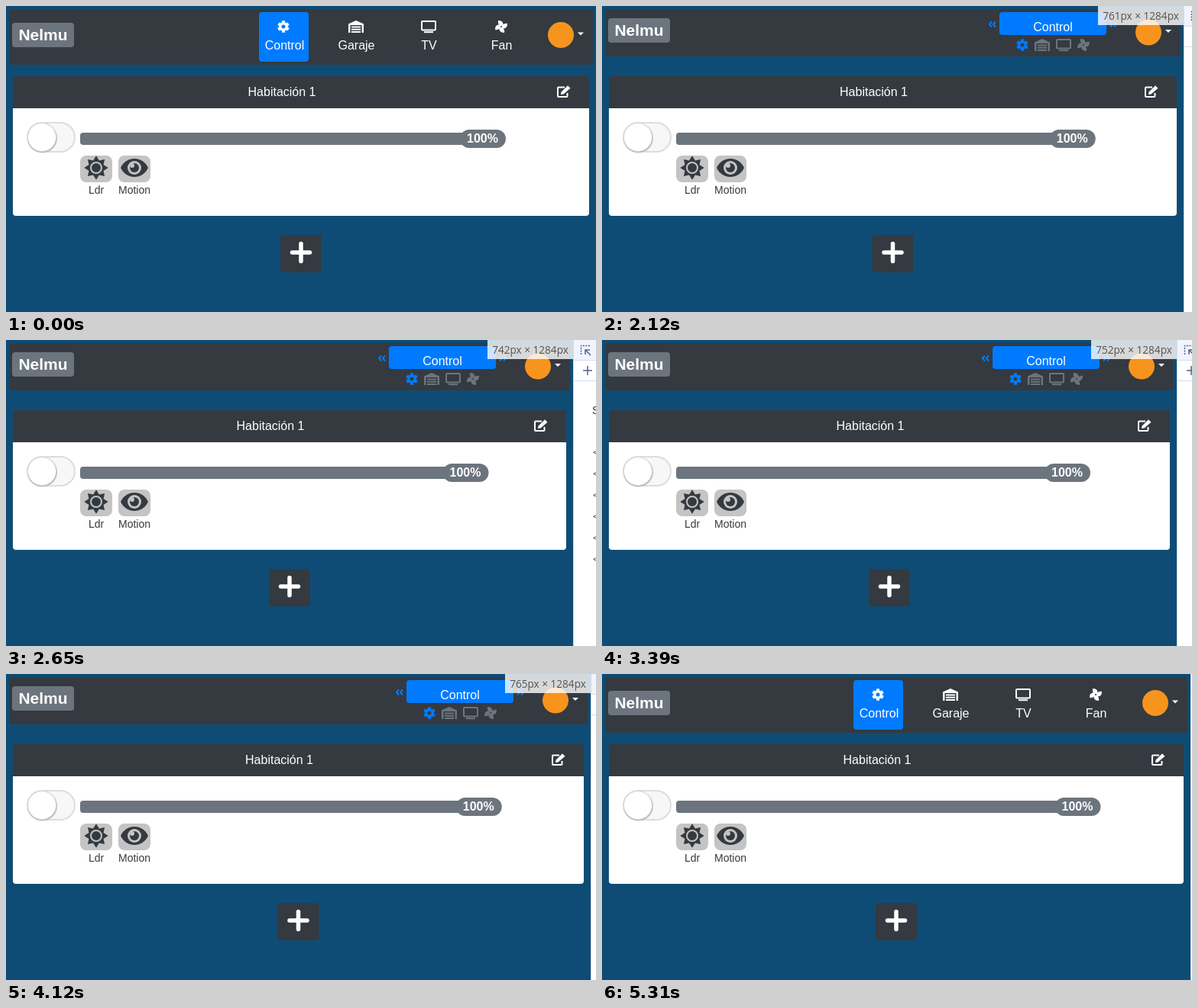
These frames come from a looping animation (772x401 px, 5.78 s). An HTML page:

```html
<!DOCTYPE html>
<html lang="es">
<head>
<meta charset="utf-8">
<style>
html, body { margin: 0; width: 100%; height: 100%; overflow: hidden; background: #0f4c75; }
svg { display: block; font: 16px "Liberation Sans", Arial, sans-serif; text-anchor: middle; }
.dark { fill: #343a40; }
.gray { fill: #6c757d; }
.chip { fill: #c4c4c4; }
.white { fill: #fff; color: #fff; }
.blue { fill: #007bff; color: #007bff; }
.muted { color: #6c757d; }
.line { fill: none; stroke: currentColor; stroke-width: 2; }
.solid { fill: currentColor; }
.bold { font-weight: bold; }
.small { font-size: 14px; }
.start { text-anchor: start; }
</style>
</head>
<body>
<svg width="772" height="401">
  <defs>
    <g id="gear" fill="none" stroke="currentColor">
      <circle r="4.2" stroke-width="3.4"/>
      <circle r="6.3" stroke-width="3" pathLength="12" stroke-dasharray="1.2 .8" stroke-dashoffset="-.4"/>
    </g>
    <g id="garage">
      <path class="solid" d="M-10-3.4L0-8 10-3.4V8H7.5V-2H-7.5V8H-10Z"/>
      <path class="line" d="M-6 .5H6M-6 3.7H6M-6 7H6"/>
    </g>
    <g id="tv" class="line">
      <rect x="-9" y="-7" width="18" height="11.5" rx="1"/>
      <path d="M-6 7.2H6"/>
    </g>
    <path id="blade" class="solid" d="M-1 0C-5-4-4.5-8-3.5-8C1-8 3.5-5 2-1Z"/>
    <g id="fan">
      <use href="#blade"/><use href="#blade" transform="rotate(90)"/>
      <use href="#blade" transform="rotate(180)"/><use href="#blade" transform="rotate(270)"/>
      <circle r="1.1" class="dark"/>
    </g>
    <path id="angles" class="line" d="M-1-3.5l-3 3.5 3 3.5M4-3.5l-3 3.5 3 3.5"/>
  </defs>

  <rect width="772" height="401" fill="#0f4c75"/>
  <rect id="nav" class="dark" x="4" y="4" rx="4"/>
  <g id="brand">
    <rect class="gray" x="8" y="22" width="81" height="32" rx="4"/>
    <text class="white bold" x="48.5" y="45" font-size="21">Nelmu</text>
  </g>

  <path id="cardBody" class="white"/>
  <path id="cardHead" class="dark"/>
  <rect x="28" y="153" width="62" height="38" rx="19" fill="#f7f7f7" stroke="#ddd" stroke-width="2"/>
  <circle cx="47.5" cy="173" r="19.5" fill="#bbb"/>
  <circle cx="47" cy="172" r="18.5" fill="#fff" stroke="#d8d8d8"/>
  <rect id="track" class="gray" x="97" y="166" height="16" rx="4"/>
  <g id="value">
    <rect class="gray" x="-30" y="162" width="60" height="24" rx="12"/>
    <text class="white bold" x="-.5" y="179">100%</text>
  </g>
  <g class="dark small">
    <rect class="chip" x="97" y="196" width="42" height="35" rx="8"/>
    <g transform="translate(118 212)">
      <polygon id="sun"/>
      <circle r="7" fill="none" stroke="#c4c4c4" stroke-width="2"/>
    </g>
    <text x="118" y="246">Ldr</text>
    <rect class="chip" x="147" y="196" width="42" height="35" rx="8"/>
    <g transform="translate(168 212)">
      <path d="M-18 0C-11-16 11-16 18 0C11 16-11 16-18 0Z"/>
      <circle class="chip" r="9"/>
      <circle r="6"/>
      <circle class="chip" cx="-3" cy="-3" r="3"/>
    </g>
    <text x="168" y="246">Motion</text>
  </g>

  <g id="middle">
    <text class="white" x="-25" y="118">Habitación 1</text>
    <rect class="dark" x="-27" y="300" width="54" height="49" rx="4"/>
    <path d="M-11.5 323H11.5M0 311.500V334.500" stroke="#fff" stroke-width="5.500" stroke-linecap="round"/>
  </g>

  <g id="right">
    <g class="white" transform="translate(-42 112)">
      <path class="line" d="M1-5.500H-7a1 1 0 0 0-1 1V6a1 1 0 0 0 1 1H3.500a1 1 0 0 0 1-1V2"/>
      <path d="M-4 4l.5-3.200L5-7.700 8.500-4.300-.5 3.500Z"/>
    </g>
    <g id="user">
      <circle cx="-46" cy="38" r="17" fill="#f7941d"/>
      <path class="white" d="M-24 34.500h8l-4 4Z"/>
    </g>
    <g id="wide" class="white">
      <rect class="blue" x="-441" y="8" width="65" height="65" rx="4"/>
      <use href="#gear" x="-409" y="27"/><text x="-407.500" y="57">Control</text>
      <use href="#garage" x="-314" y="27"/><text x="-313.500" y="57">Garaje</text>
      <use href="#tv" x="-219" y="27"/><text x="-218.500" y="57">TV</text>
      <use href="#fan" x="-124" y="27"/><text x="-123.500" y="57">Fan</text>
    </g>
    <g id="narrow" class="muted">
      <rect class="blue" x="-241" y="8" width="140" height="30" rx="4"/>
      <text class="white" x="-171" y="33">Control</text>
      <g class="blue">
        <use href="#angles" x="-250" y="24"/>
        <use href="#angles" transform="translate(-92 24) scale(-1)"/>
        <use href="#gear" x="-211" y="51"/>
      </g>
      <use href="#garage" x="-185" y="51"/>
      <use href="#tv" x="-157" y="51"/>
      <use href="#fan" x="-131" y="51"/>
    </g>
    <rect class="white" width="60" height="401"/>
    <rect width="60" height="26" fill="#f1f4fc"/>
    <path d="M.5 0V401M0 26.500H60M0 53.500H60" stroke="#d3dcf0"/>
    <g fill="none" stroke="#50618c" stroke-width="1.500">
      <path d="M10.500 19V7.500H23" stroke-dasharray="2 1.500"/>
      <path d="M23 20l-7-7m0 6v-6h6"/>
      <path d="M13 40H25M19 34V46"/>
    </g>
    <g id="panelText" class="dark small start"><text x="25" y="97">S</text></g>
    <g id="label">
      <rect x="-112" width="112" height="25" fill="#fff" fill-opacity=".8"/>
      <text id="size" x="-56" y="18" fill="#323232" fill-opacity=".8" font-family="Open Sans, sans-serif" font-size="13.6"></text>
    </g>
  </g>
</svg>
<script>
const $ = id => document.getElementById(id);
const set = (id, attrs) => { for (const k in attrs) $(id).setAttribute(k, attrs[k]); };
const move = (id, x, y = 0) => set(id, { transform: `translate(${x} ${y})` });
const show = (id, on) => set(id, { display: on ? "inline" : "none" });

const LOOP = 5780, DRAG_START = 1920, LABEL_END = 5310, TICK = 200 / 3;
// [tick, viewport width] while the window edge is dragged
const drag = [[0, 768], [7, 752], [11, 742], [16, 742], [22, 752], [33, 765], [34, 769], [35, 769], [36, 770]];

set("sun", { points: Array.from({ length: 16 }, (_, i) => {
  const r = i % 2 ? 10.3 : 15.7, a = i * Math.PI / 8;
  return [r * Math.cos(a), r * Math.sin(a)];
}).join(" ") });

for (let i = 0; i < 6; i++)
  $("panelText").insertAdjacentHTML("beforeend", `<text x="26" y="${151 + 28 * i}" font-size="11">&lt;</text>`);

function widthAt(t) {
  if (t < DRAG_START) return 772;
  const tick = Math.floor((t - DRAG_START + 5) / TICK);
  const i = drag.findIndex(p => p[0] > tick);
  if (i < 0) return 770;
  const [k0, w0] = drag[i - 1], [k1, w1] = drag[i];
  return Math.round(w0 + (w1 - w0) * (tick - k0) / (k1 - k0));
}

function draw(t) {
  const w = widthAt(t), wide = w >= 768, thumb = .75 * w + 45, inner = w - 26;
  set("nav", { width: w - 8, height: wide ? 73 : 62 });
  move("brand", 0, wide ? 0 : -6);
  move("user", 0, wide ? 0 : -3.5);
  set("cardHead", { d: `M9 134V96a4 4 0 0 1 4-4h${inner}a4 4 0 0 1 4 4v38Z` });
  set("cardBody", { d: `M9 134V271a4 4 0 0 0 4 4h${inner}a4 4 0 0 0 4-4V134Z` });
  set("track", { width: thumb - 97 });
  move("value", thumb);
  move("middle", w / 2);
  move("right", w);
  show("wide", wide);
  show("narrow", !wide);
  show("label", t >= DRAG_START && t < LABEL_END);
  $("size").textContent = `${w}px × 1284px`;
}

const start = performance.now();
function frame() {
  draw((performance.now() - start) % LOOP);
  requestAnimationFrame(frame);
}
frame();
</script>
</body>
</html>
```
